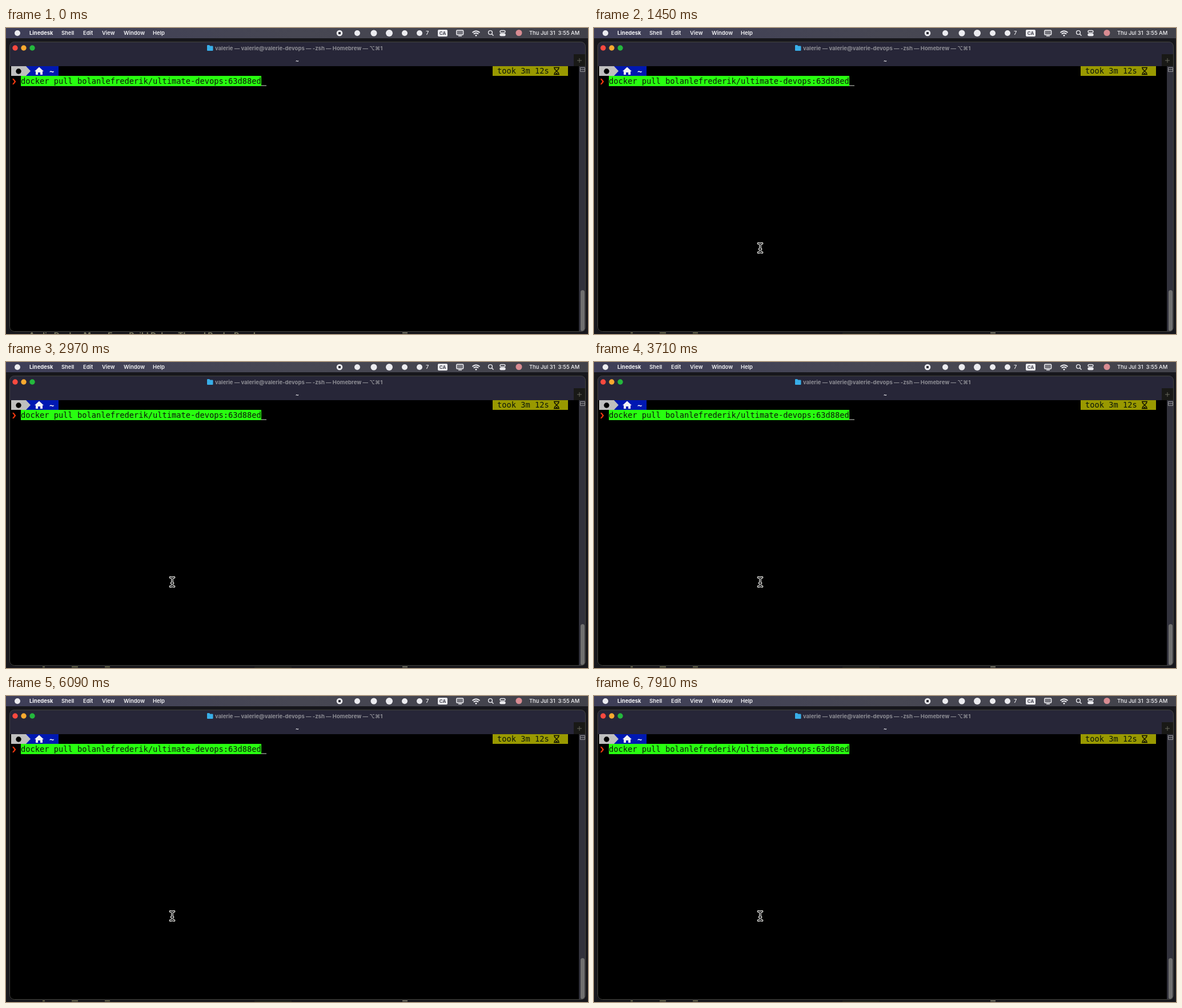
Write an HTML page that moves like this. It is 1019 px wide and 537 px high and loops after 8 s.

```html
<!DOCTYPE html>
<html lang="en">
<head>
<meta charset="utf-8">
<title>Shell session</title>
<style>
  html, body { margin: 0; width: 100%; height: 100%; overflow: hidden; background: #14141a; }
  svg { display: block; }
  text { white-space: pre; }
  .ui { font: 600 9.4px Inter, sans-serif; fill: #f4f4f6; }
  .app { font-weight: 700; }
  .light { font-weight: 500; }
  .title { font: 700 9.5px Inter, sans-serif; fill: #8d8d94; }
  .mono { font: 13.71px "DejaVu Sans Mono", monospace; fill: #0c160a; }
  .behind { font: 700 14px Inter, sans-serif; fill: #77775f; }
  .line { fill: none; stroke: #ececf0; stroke-width: 1.4; }
  .white { fill: #ececf0; }
</style>
</head>
<body>
<svg width="1019" height="537" viewBox="0 0 1019 537">
  <defs>
    <linearGradient id="bar">
      <stop offset="0" stop-color="#3e3e58"/>
      <stop offset=".5" stop-color="#474753"/>
      <stop offset="1" stop-color="#42424a"/>
    </linearGradient>
    <clipPath id="win"><rect x="6" y="24" width="1009" height="509" rx="8"/></clipPath>
    <clipPath id="strip"><rect y="534" width="1019" height="3"/></clipPath>
    <path id="beam" d="M-3.5-8q3.5 0 3.5 2.5q0-2.5 3.5-2.5M0-5.5v11M-3.5 8q3.5 0 3.5-2.5q0 2.5 3.5 2.5M-1.5 2h3"/>
  </defs>

  <!-- desktop and the window behind -->
  <rect width="1019" height="537" fill="#17171c"/>
  <g clip-path="url(#strip)">
    <text id="before" class="behind" x="40" y="545">Audio Docker Menu Error Build Debug Thread Books Panel</text>
    <g id="after" fill="#68684e">
      <path d="M64 534h4v2h-4zM115 534h11v2h-11zM173 534h9v2h-9z"/>
      <path d="M435 535h65v1h-65z" fill="#2b2d20"/>
    </g>
    <path d="M694 534h9v2h-9z" fill="#777768"/>
  </g>

  <!-- menu bar -->
  <rect width="1019" height="18" fill="url(#bar)"/>
  <circle cx="20" cy="9" r="5" class="white"/>
  <g class="ui">
    <text x="41" y="12" class="app">Linedesk</text>
    <text x="97" y="12">Shell</text>
    <text x="135" y="12">Edit</text>
    <text x="168" y="12">View</text>
    <text x="206" y="12">Window</text>
    <text x="257" y="12">Help</text>
    <text x="735" y="12" class="light">7</text>
    <text x="916" y="12" class="light">Thu Jul 31  3:55 AM</text>
  </g>
  <g class="white">
    <circle cx="584" cy="9" r="5.3"/>
    <circle cx="615" cy="9" r="5"/>
    <circle cx="644" cy="9" r="5.5"/>
    <circle cx="671" cy="9" r="6"/>
    <circle cx="698" cy="9" r="5"/>
    <circle cx="724" cy="9" r="5"/>
    <rect x="756" y="3" width="17" height="12" rx="2"/>
  </g>
  <rect x="582" y="7" width="4" height="4" fill="#33333c"/>
  <text x="764.5" y="12" text-anchor="middle" class="ui" style="font-size:8px;fill:#3a3a46">CA</text>
  <g class="line">
    <rect x="788.7" y="4" width="12" height="8" rx="1.5" fill="#77777f"/>
    <path d="M792 14h6"/>
    <path d="M816.5 8q6.5-5.5 13 0M818.8 10.5q4.2-3.6 8.4 0" stroke-width="1.8"/>
    <circle cx="848" cy="8" r="3.4"/>
    <path d="M850.5 10.5l3 3"/>
    <rect x="865" y="4.5" width="9" height="3.6" rx="1.8"/>
    <rect x="865" y="10" width="9" height="3.6" rx="1.8" fill="#ececf0"/>
  </g>
  <circle cx="823" cy="13" r="1.5" class="white"/>
  <circle cx="898" cy="8.5" r="5.5" fill="#d98c92"/>

  <!-- shell window -->
  <g clip-path="url(#win)">
    <rect x="6" y="24" width="1009" height="509"/>
    <rect x="6" y="24" width="1009" height="43" fill="#272638"/>
    <rect x="994" y="46" width="21" height="21" fill="#191916"/>
    <path d="M1000 57h8M1004 53v8" stroke="#68685e"/>
    <rect x="1003" y="67" width="12" height="466" fill="#32323c"/>
    <rect x="1006" y="460" width="7" height="72" rx="3.5" fill="#707070"/>
    <path d="M1005.5 69.5h8v7h-8zM1005.5 73h8" fill="none" stroke="#96969a"/>
  </g>
  <rect x="6.5" y="24.5" width="1008" height="508" rx="8" fill="none" stroke="#44443e"/>
  <circle cx="16" cy="35" r="4.7" fill="#f8493f"/>
  <circle cx="31" cy="35" r="4.7" fill="#f9a92f"/>
  <circle cx="46" cy="35" r="4.7" fill="#24b83d"/>
  <path d="M352 31q0-1 1-1h3l1.5 1.5h4q1 0 1 1V39q0 1-1 1h-8.5q-1 0-1-1z" fill="#38aee8"/>
  <text x="366" y="38.5" class="title">valerie — valerie@valerie-devops — -zsh — Homebrew — ⌥⌘1</text>
  <text x="510" y="60.5" text-anchor="middle" class="ui">~</text>

  <!-- prompt -->
  <path d="M34 67h58v17H34z" fill="#0018b2"/>
  <path d="M9 67h26l8 8.5-8 8.5H9z" fill="#bfbfbf"/>
  <circle cx="22" cy="76" r="4.7"/>
  <path d="M50 76l8-7.5 8 7.5h-2v6h-4v-4h-4v4h-4v-6z" fill="#f2f2f4"/>
  <text x="76" y="80.5" class="mono" style="fill:#fff;font-weight:700">~</text>
  <path d="M852 67h132v17H852z" fill="#999900"/>
  <text x="860" y="80" class="mono">took 3m 12s</text>
  <path d="M959 69.5h10M959 81.5h10M960.5 70v2l3.5 3.5 3.5-3.5v-2M960.5 81v-2l3.5-3.5 3.5 3.5v2" fill="none" stroke="#111100" stroke-width="1.5"/>
  <path d="M961.5 81l2.5-2.5 2.5 2.5z" fill="#111100"/>
  <path d="M11 89h2.5l4 5-4 5H11l3.5-5z" fill="#f0380f"/>
  <rect x="26" y="84" width="421" height="18" fill="#28fe10"/>
  <text x="26" y="98" class="mono">docker pull bolanlefrederik/ultimate-devops:63d88ed</text>
  <rect id="caret" x="447" y="100.5" width="9" height="1.3" fill="#a4aaa0"/>

  <!-- text pointer -->
  <g id="pointer" fill="none" stroke-linecap="round" stroke-linejoin="round">
    <use href="#beam" stroke="#e6e6e2" stroke-width="3.8"/>
    <use href="#beam" stroke="#18181a" stroke-width="1.4"/>
  </g>
</svg>
<script>
  const LOOP = 8000, BLINK = 1200;
  const get = id => document.getElementById(id);
  const show = (id, on) => get(id).setAttribute('visibility', on ? 'visible' : 'hidden');
  const progress = (t, from, to) => {
    const p = Math.min(1, Math.max(0, (t - from) / (to - from)));
    return p * p * (3 - 2 * p);
  };

  function draw(t) {
    const p = progress(t, 590, 1000);
    show('caret', t % BLINK < BLINK / 2);
    show('pointer', t >= 550);
    get('pointer').setAttribute('transform', `translate(${243 + 48 * p} ${410 - 24 * p})`);
    show('before', t < 1000);
    show('after', t >= 1000);
  }

  const start = performance.now();
  function tick() {
    draw((performance.now() - start) % LOOP);
    requestAnimationFrame(tick);
  }
  tick();
</script>
</body>
</html>
```
